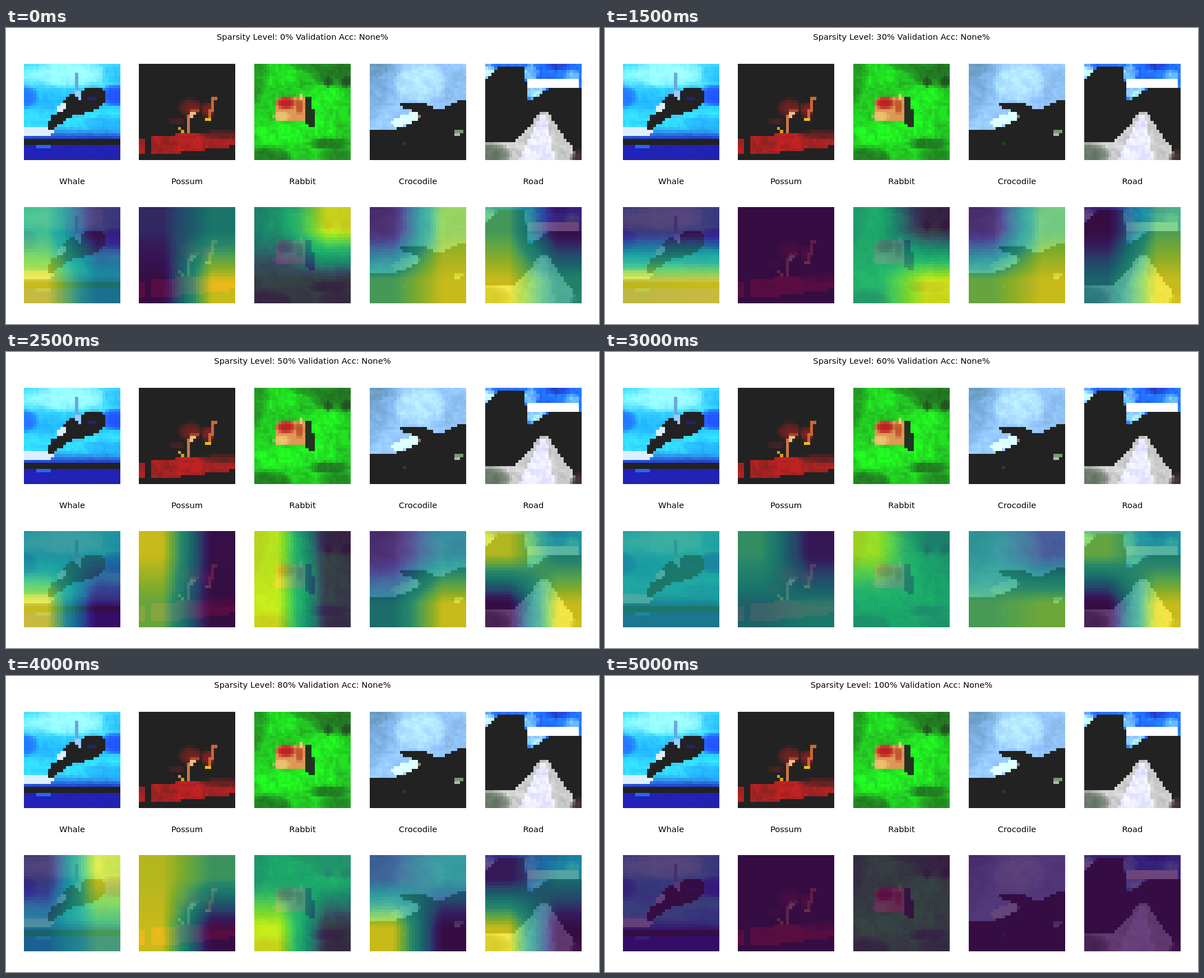
Recreate the animation shown at these times as an HTML page with a canvas. Size 1058 px wide and 529 px high, loop 5.5 s.

```html
<!DOCTYPE html>
<html lang="en">
<head>
<meta charset="utf-8">
<title>Sparsity heat maps</title>
<style>
  html, body { margin: 0; width: 100%; height: 100%; overflow: hidden; background: #fff; }
  canvas, svg { position: absolute; left: 0; top: 0; width: 1058px; height: 529px; }
  text { font: 14.7px "DejaVu Sans", Verdana, sans-serif; text-anchor: middle; fill: #000; }
</style>
</head>
<body>
<canvas id="stage" width="1058" height="529"></canvas>
<svg id="labels" viewBox="0 0 1058 529"><text id="title" x="529" y="21"></text></svg>
<script>
const N = 32, SIZE = 172, STEP_MS = 500, STEPS = 11;
const clamp = (v, lo, hi) => Math.min(hi, Math.max(lo, v));
const mix = (a, b, k) => a.map((v, i) => v + (b[i] - v) * k);
const rgb = hex => [...hex].map(d => parseInt(d, 16) * 17);

function random(seed) {
  return () => {
    seed = (seed * 1664525 + 1013904223) >>> 0;
    return seed / 4294967296;
  };
}

// Colour at k (0..1) along evenly spaced stops.
function ramp(stops, k) {
  const p = clamp(k, 0, 1) * (stops.length - 1);
  const i = Math.min(stops.length - 2, Math.floor(p));
  return mix(stops[i], stops[i + 1], p - i);
}

// A small grid of coloured cells built from flat and soft shapes.
class Picture {
  constructor(base = '222') {
    this.cells = Array.from({ length: N * N }, () => rgb(base));
  }
  each(fn) {
    this.cells = this.cells.map((c, i) => fn(c, i % N + 0.5, Math.floor(i / N) + 0.5));
    return this;
  }
  fill(color, test) {
    const to = rgb(color);
    return this.each((c, x, y) => test(x, y) ? to : c);
  }
  fade(colors, top, bottom) {
    const stops = colors.split(' ').map(rgb);
    return this.each((c, x, y) =>
      y > top && y < bottom ? ramp(stops, (y - top) / (bottom - top)) : c);
  }
  // A round-ended line.
  line(color, x1, y1, x2, y2, r) {
    const dx = x2 - x1, dy = y2 - y1, len = dx * dx + dy * dy || 1;
    return this.fill(color, (x, y) => {
      const k = clamp(((x - x1) * dx + (y - y1) * dy) / len, 0, 1);
      return Math.hypot(x - x1 - k * dx, y - y1 - k * dy) < r;
    });
  }
  dot(color, x, y) {
    return this.fill(color, (px, py) => Math.floor(px) === x && Math.floor(py) === y);
  }
  glow(cx, cy, rx, ry, color, power = 1) {
    const to = rgb(color);
    return this.each((c, x, y) => {
      const d = ((x - cx) / rx) ** 2 + ((y - cy) / ry) ** 2;
      return d < 1 ? mix(c, to, power * (1 - d * d)) : c;
    });
  }
  // Blotchy brightness: each cell leans on its left and upper neighbours.
  grain(seed, amount) {
    const rand = random(seed), noise = [];
    this.cells = this.cells.map((c, i) => {
      noise[i] = (rand() - 0.5) * amount + 0.4 * ((noise[i - 1] || 0) + (noise[i - N] || 0));
      return c.map(v => v <= 34 ? 34 : v >= 255 ? 255 : clamp(v * (1 + noise[i]), 34, 255));
    });
    return this;
  }
}

const whale = new Picture()
  .fade('4df 8ff 3cf 2bf 3df 3df 23c', 0, 25)
  .glow(15, 3, 13, 5, '9ff')
  .glow(31, 4, 6, 5, '3cf')
  .glow(0, 11, 5, 4, '27f')
  .glow(31, 10.5, 7, 4, '25f')
  .glow(31, 20, 14, 3, '2af', 0.7)
  .fade('22a 22b 22a', 27, 32)
  .line('26e', 5, 27.5, 8, 27.5, 0.6)
  .grain(4, 0.09)
  .line('def', 0, 22.5, 8, 22.5, 1.6)
  .line('6ad', 17.5, 4, 17.5, 8, 0.6)
  .line('222', 17, 13.6, 23.4, 11.3, 3.7)
  .line('222', 15, 16, 10.5, 19, 1.8)
  .line('222', 10, 18, 8.7, 21.5, 0.9)
  .line('def', 11.5, 15.5, 13.5, 13.8, 1)
  .line('9cf', 18, 9.5, 18.5, 11.5, 0.9)
  .line('227', 22, 11.5, 23, 11.5, 0.6);

const possum = new Picture()
  .fill('a22', (x, y) => (x < 2 || x > 4) && y > Math.max(23, 25 - x / 8) && y < 30 - Math.max(0, x - 10) / 8)
  .glow(31, 23.5, 12, 1.8, '522', 0.8)
  .glow(17, 14.5, 4, 3.5, '622')
  .glow(23, 15.5, 2.5, 3, '722')
  .glow(12.5, 19, 3, 1.5, '422')
  .grain(8, 0.2)
  .line('a42', 17.5, 16, 19, 15.5, 0.9)
  .line('c74', 16.5, 18, 16.5, 22, 0.6)
  .line('eb8', 18, 16.5, 17.5, 17.5, 0.7)
  .line('c63', 25, 11.5, 23.5, 18, 0.6)
  .line('eb2', 22.5, 18.5, 23.5, 18.5, 0.6)
  .line('d92', 13.5, 21.5, 14.5, 22.5, 0.6);

const rabbit = new Picture('2c2')
  .glow(9, 4, 8, 5, '2d2')
  .glow(22, 14, 10, 8, '2e2')
  .glow(14, 23, 16, 5, '2e2')
  .glow(0, 2, 5, 12, '282', 0.7)
  .glow(28, 2, 11, 6, '262', 0.8)
  .glow(20, 0, 9, 3, '282', 0.7)
  .glow(25, 26.5, 8, 2.2, '262', 0.8)
  .glow(3, 31, 10, 4, '262', 0.8)
  .glow(29, 31, 8, 4, '272', 0.7)
  .grain(23, 0.16)
  .glow(24.5, 6, 1.5, 2, '242', 0.8)
  .glow(30.5, 6, 2.2, 2, '242', 0.8)
  .line('232', 17.8, 12, 18.6, 19.6, 1.4)
  .fill('d95', (x, y) => x > 7 && x < 17 && y > 10.6 && y < 19 && x + y > 19)
  .glow(10.5, 13, 3.5, 2.3, 'b22')
  .glow(15, 14, 1.6, 3, 'b42', 0.8)
  .glow(9, 17.5, 3, 2, 'ec7', 0.8)
  .line('dc7', 15.5, 10.5, 15.5, 11.5, 0.6);

const crocodile = new Picture('9cf')
  .glow(0, 5, 11, 14, '7ad', 0.8)
  .glow(0, 0, 9, 5, '69b', 0.7)
  .glow(31, 8, 8, 7, '8be', 0.6)
  .glow(17, 6, 9, 7, 'bef', 0.8)
  .line('dff', 9, 19.5, 15, 17.5, 1.6)
  .grain(12, 0.09)
  .fill('222', (x, y) => {
    const back = 13 + clamp((x - 18) * 0.45, 0, 3.4);
    const jaw = 21.7 - Math.max(0, x - 9) * 0.45;
    return y > jaw || x > 10 && y > back && (x > 17 || y < 14 + (x - 10) * 0.4);
  })
  .dot('876', 16, 17)
  .line('797', 28.5, 22.5, 30.5, 22.5, 0.6)
  .line('aba', 28.5, 23.5, 29.5, 23.5, 0.6)
  .dot('242', 11, 26);

const road = new Picture('27f')
  .glow(24, 1, 5, 1.6, '24c')
  .glow(15, 3, 3, 3, '7cf')
  .glow(16.5, 9, 4, 3, 'aef')
  .glow(29, 4, 3, 2, '6bf')
  .glow(1, 3, 3, 3, 'bef')
  .grain(16, 0.25)
  .fill('222', (x, y) => y > (x < 13 ? Math.max(1, 5.5 - x) : Math.max(8, 12.4 - Math.abs(x - 15) * 0.7))
    || x > 11.5 && x < 14 && y > (x - 11) * 2.2)
  .fill('fff', (x, y) => x > 14 && x < 31 && y > 5 && y < 8)
  .fill('ccc', (x, y) => y > 16 && x < 20.5 + (y - 16) * 0.7 && (y > 26 || x > 18.5 - (y - 16) * 0.85))
  .fill('eef', (x, y) => y > 17 && x < 20 + (y - 16) * 0.2 && x > 19 - (y - 16) * 0.5)
  .glow(1, 30, 8, 4, '676')
  .glow(31, 32, 3, 4, '433')
  .grain(31, 0.1);

// Each map leans towards an angle in degrees and bends by a twist; null is all cold.
const levels = [0, 1, 3, 5, 7, 8];
const panels = [
  { name: 'Whale', x: 32, pic: whale,
    lean: [[147, .1], [-2, 0], [89, 0], [171, -1], [-9, .9], [5, -.5]] },
  { name: 'Possum', x: 237, pic: possum,
    lean: [[15, .5], [53, -.1], null, [187, .1], [32, 1.2], [207, -.5]] },
  { name: 'Rabbit', x: 443, pic: rabbit,
    lean: [[-67, -.4], [-42, .9], [97, .9], [178, 0], [-36, .8], [184, -1.1]] },
  { name: 'Crocodile', x: 649, pic: crocodile,
    lean: [[37, -.4], [252, -4.8], [47, -.4], [47, .1], [152, .4], [160, -1.5]] },
  { name: 'Road', x: 855, pic: road,
    lean: [[143, .2], [-4, .4], [27, -.1], [-41, 1.8], [-9, 1.3], [145, -1.7]] },
];

// Heat in the four corners, scaled to 0..1.
function corners(lean) {
  if (!lean) return [0, 0, 0, 0];
  const a = lean[0] * Math.PI / 180;
  const raw = [[-1, -1], [1, -1], [-1, 1], [1, 1]]
    .map(([u, v]) => u * Math.cos(a) + v * Math.sin(a) + lean[1] * u * v);
  const lo = Math.min(...raw), hi = Math.max(...raw);
  return raw.map(h => (h - lo) / (hi - lo));
}

function cornersAt(lean, step) {
  const known = levels.indexOf(step);
  if (known >= 0 || step === 10) return corners(lean[known]);
  return mix(cornersAt(lean, step - 1), cornersAt(lean, step + 1), 0.5);
}

const viridis = '415 427 358 278 298 3a8 6c6 ad3 fe2'.split(' ').map(rgb);

function overlay(cells, [tl, tr, bl, br]) {
  const at = p => clamp((p + 0.5) / 16 - 0.5, 0, 1);
  return cells.map((c, i) => {
    const u = at(i % N), v = at(Math.floor(i / N));
    const heat = (tl + (tr - tl) * u) * (1 - v) + (bl + (br - bl) * u) * v;
    return ramp(viridis, heat).map((h, k) => h * 0.78 + (c[k] - 34) * 0.25);
  });
}

const ctx = document.getElementById('stage').getContext('2d');
ctx.imageSmoothingEnabled = false;
const small = document.createElement('canvas');
small.width = small.height = N;
const smallCtx = small.getContext('2d');

function show(cells, x, y) {
  const img = smallCtx.createImageData(N, N);
  cells.forEach((c, i) => img.data.set([...c.map(Math.round), 255], i * 4));
  smallCtx.putImageData(img, 0, 0);
  ctx.drawImage(small, x, y, SIZE, SIZE);
}

const labels = document.getElementById('labels');
const title = document.getElementById('title');
for (const p of panels) {
  const label = document.createElementNS('http://www.w3.org/2000/svg', 'text');
  label.setAttribute('x', p.x + SIZE / 2);
  label.setAttribute('y', 279);
  label.textContent = p.name;
  labels.append(label);
  show(p.pic.cells, p.x, 64);
}

function draw(step) {
  title.textContent = `Sparsity Level: ${step * 10}% Validation Acc: None%`;
  for (const p of panels) show(overlay(p.pic.cells, cornersAt(p.lean, step)), p.x, 320);
}

const start = performance.now();
let shown = 0;
draw(0);
function tick() {
  const step = Math.floor((performance.now() - start) / STEP_MS) % STEPS;
  if (step !== shown) draw(shown = step);
  requestAnimationFrame(tick);
}
requestAnimationFrame(tick);
</script>
</body>
</html>
```
